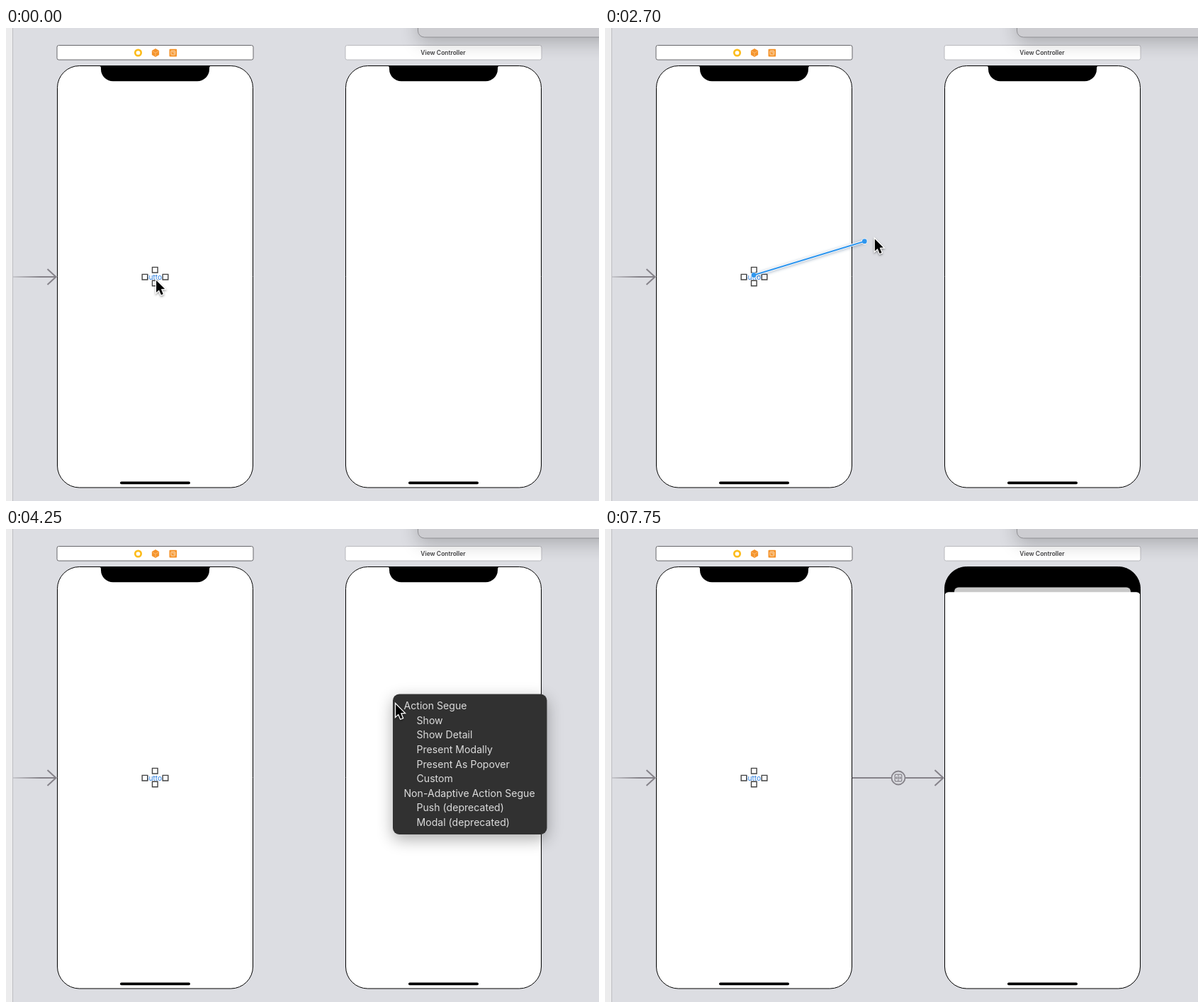
Recreate the animation shown at these times as an HTML page with a canvas. Size 837 by 669 pixels, loop 8000 ms.

```html
<!DOCTYPE html>
<html lang="en">
<head>
<meta charset="utf-8">
<title>Connecting two screens</title>
<style>
html, body { margin: 0; width: 100%; height: 100%; overflow: hidden; background: #dcdde2; }
canvas { display: block; }
</style>
</head>
<body>
<canvas id="stage" width="837" height="669"></canvas>
<script>
const ctx = document.getElementById('stage').getContext('2d');
const LOOP = 8000, STEP = 50;
const FONT = 'Inter, "Liberation Sans", sans-serif';
const GREY = '#858289', BLUE = '#2f96ee';
const RIGHT = 407; // offset of the second screen
const MENU = { x: 546, y: 233.5, w: 217.5, h: 198.5, row: 20.6 };
const ROWS = [
  'Action Segue', '  Show', '  Show Detail', '  Present Modally', '  Present As Popover',
  '  Custom', 'Non-Adaptive Action Segue', '  Push (deprecated)', '  Modal (deprecated)'
];

const progress = (t, a, b) => Math.min(1, Math.max(0, (t - a) / (b - a)));
const ease = k => k * k * (3 - 2 * k);
const mix = (a, b, k) => [a[0] + (b[0] - a[0]) * k, a[1] + (b[1] - a[1]) * k];
const move = (t, t0, t1, a, b) => mix(a, b, ease(progress(t, t0, t1)));

function layer(draw, alpha = 1) {
  ctx.save();
  ctx.globalAlpha *= alpha;
  draw();
  ctx.restore();
}

function paint(fill, stroke, width = 1) {
  if (fill) { ctx.fillStyle = fill; ctx.fill(); }
  if (stroke) { ctx.strokeStyle = stroke; ctx.lineWidth = width; ctx.stroke(); }
}

function box(x, y, w, h, r, fill, stroke, width) {
  ctx.beginPath();
  ctx.roundRect(x, y, w, h, r);
  paint(fill, stroke, width);
}

function disc(x, y, r, fill, stroke, width) {
  ctx.beginPath();
  ctx.arc(x, y, r, 0, 2 * Math.PI);
  paint(fill, stroke, width);
}

function line(points, stroke, width) {
  ctx.beginPath();
  points.forEach(p => ctx.lineTo(p[0], p[1]));
  paint(null, stroke, width);
}

function shadow(color, blur, dy) {
  ctx.shadowColor = color;
  ctx.shadowBlur = blur;
  ctx.shadowOffsetY = dy;
}

function text(str, x, y, size, color, weight = 400, align = 'center') {
  ctx.font = `${weight} ${size}px ${FONT}`;
  ctx.textAlign = align;
  ctx.fillStyle = color;
  ctx.fillText(str, x, y);
}

function background() {
  ctx.fillStyle = '#dcdde2';
  ctx.fillRect(0, 0, 837, 669);
  ctx.fillStyle = '#ececed';
  ctx.fillRect(0, 0, 9, 669);
  ctx.fillStyle = '#bdbdc1';
  ctx.fillRect(9, 0, 1, 669);
}

function panel() {
  layer(() => {
    shadow('rgba(0,0,0,.22)', 26, 8);
    box(581.5, -40, 300, 53, 9, '#cdcdd1');
  });
  box(581.5, -40, 300, 53, 9, null, '#8f8f93');
}

function titleBars() {
  box(72, 24.5, 277, 20.5, 2.5, '#fff', '#66666a');
  box(479, 24.5, 277, 20.5, 2.5, '#fff', '#b9b9be');
}

function icons() {
  disc(186.5, 35, 4.2, null, '#fcbc1c', 2.7);
  ctx.beginPath();
  for (let i = 0; i < 6; i++) {
    const a = Math.PI / 6 + i * Math.PI / 3;
    ctx.lineTo(211 + 5.9 * Math.cos(a), 35 + 5.9 * Math.sin(a));
  }
  paint('#f5942c');
  line([[206.5, 32.7], [211, 35.2], [215.5, 32.7]], '#fbc98d', .7);
  line([[211, 35.2], [211, 40]], '#fbc98d', .7);
  box(230.5, 29.8, 10.6, 10.6, 1, '#f5942c');
  box(233, 32.3, 5.6, 5.6, .5, null, '#fde0be', 1);
  line([[235.8, 33], [235.8, 35.2], [238, 35.2]], '#fde0be', .8);
}

function screenPath(dx) {
  ctx.beginPath();
  ctx.roundRect(72.5 + dx, 53.5, 276, 596.5, 31);
}

function notch(dx) {
  const l = 134 + dx, r = 287 + dx;
  ctx.beginPath();
  ctx.moveTo(l - 4, 53);
  ctx.quadraticCurveTo(l, 53, l, 57);
  ctx.arcTo(l, 75.3, l + 17, 75.3, 17);
  ctx.arcTo(r, 75.3, r, 57, 17);
  ctx.lineTo(r, 57);
  ctx.quadraticCurveTo(r, 53, r + 4, 53);
  paint('#000');
}

function phone(dx, asSheet) {
  screenPath(dx);
  paint(asSheet ? '#000' : '#fff');
  if (asSheet) {
    layer(() => {
      ctx.clip();
      box(493, 82.5, 249, 30, 6, '#c8c8c8');
      box(479, 89.3, 277, 600, 6, '#fff');
    });
  } else {
    notch(dx);
  }
  screenPath(dx);
  paint(null, '#000', 1);
  box(161 + dx, 641.6, 99, 3.6, 1.8, '#000');
}

function arrowHead(x) {
  line([[x - 12, 341], [x, 352], [x - 12, 363]], GREY, 2);
}

function entryArrow() {
  const fade = ctx.createLinearGradient(10, 0, 48, 0);
  fade.addColorStop(0, 'rgba(133,130,137,.25)');
  fade.addColorStop(1, GREY);
  line([[10, 352], [70, 352]], fade, 2);
  arrowHead(70.5);
}

function segue() {
  line([[349, 352], [404.5, 352]], GREY, 2);
  line([[423.5, 352], [477, 352]], GREY, 2);
  arrowHead(477.5);
  disc(414, 352, 9.5, null, GREY, 1.8);
  box(409.2, 347.2, 9.6, 9.6, 1, null, GREY, 1.2);
  line([[414, 347], [414, 357]], GREY, 1);
  line([[410.5, 352], [417.5, 352]], GREY, 1);
  line([[412, 350], [410.5, 352], [412, 354]], GREY, 1);
  line([[416, 350], [417.5, 352], [416, 354]], GREY, 1);
}

function button() {
  text('Button', 210.5, 355.8, 10.2, '#2b7ee0');
  [[210.3, 342.2], [210.3, 361], [196, 352.2], [225, 352.2]].forEach(([x, y]) =>
    box(x - 3.8, y - 3.8, 7.6, 7.6, 0, '#fff', '#414141', 1.4));
}

function highlight(dx) {
  const x = 71 + dx;
  layer(() => {
    box(x, 51.5, 280, 600.5, 1, 'rgba(0,117,255,.24)');
    box(x - .5, 51, 281, 601.5, 1, null, 'rgba(226,240,255,.6)');
  });
  layer(() => {
    shadow('rgba(0,0,0,.5)', 4, 1);
    box(x + 248.5, 646, 65, 16, 5, '#2b2d2c');
  });
  box(x + 249.2, 646.7, 63.6, 14.6, 4.5, null, '#e9edf0', 1.4);
  text('View', x + 281, 659.2, 14, '#fff', 600);
}

function connection(end) {
  const start = [210, 349.5];
  layer(() => {
    shadow('rgba(0,40,90,.35)', 4, 1);
    line([start, end], '#fff', 4);
  });
  [start, end].forEach(p => disc(p[0], p[1], 4.2, '#fff'));
  line([start, end], BLUE, 2.1);
  [start, end].forEach(p => disc(p[0], p[1], 3.4, BLUE));
}

function menu(active) {
  layer(() => {
    shadow('rgba(0,0,0,.32)', 22, 7);
    box(MENU.x, MENU.y, MENU.w, MENU.h, 9, '#313131');
  });
  ROWS.forEach((label, i) => {
    const mid = 250.2 + i * MENU.row, on = i === active;
    if (on) {
      ctx.fillStyle = '#141414';
      ctx.fillRect(MENU.x, mid - 10, MENU.w, MENU.row);
    }
    const indent = label.startsWith(' ') ? 18 : 0;
    text(label.trim(), 561.5 + indent, mid + 5, 14.1, on ? '#fff' : '#dcdcdc', on ? 500 : 400, 'left');
  });
}

function pointer([x, y]) {
  layer(() => {
    ctx.translate(x + .6, y + 1);
    ctx.lineJoin = 'miter';
    ctx.beginPath();
    [[0, 0], [0, 17], [3.9, 13.4], [6.9, 20.4], [9.7, 19.2], [6.8, 12.3], [12, 12]]
      .forEach(p => ctx.lineTo(p[0], p[1]));
    ctx.closePath();
    layer(() => {
      shadow('rgba(0,0,0,.4)', 3, 1.5);
      paint(null, '#fff', 2.6);
    });
    paint('#000');
  });
}

function hand() {
  const fingers = [[207.5, 343, 210.5, 350], [211.3, 340, 212.8, 349],
    [215.5, 340, 215.7, 349], [219.5, 342.8, 218.8, 350], [205.6, 349.3, 210, 354]];
  const palm = () => {
    ctx.beginPath();
    [[209.5, 348], [220, 347], [219.5, 353], [217.5, 358], [211, 358], [208, 353.5]]
      .forEach(p => ctx.lineTo(p[0], p[1]));
    ctx.closePath();
  };
  layer(() => {
    ctx.lineCap = ctx.lineJoin = 'round';
    fingers.forEach(f => line([[f[0], f[1]], [f[2], f[3]]], '#000', 5.2));
    palm();
    paint('#000', '#000', 3);
    fingers.forEach(f => line([[f[0], f[1]], [f[2], f[3]]], '#fff', 3));
    palm();
    paint('#fff', '#fff', .6);
    [212, 214.7, 217.4].forEach(x => line([[x, 349.5], [x, 354.5]], '#000', 1.1));
  });
}

const dragPoint = t => move(t, 2300, 3100, [211, 348], [549.5, 247]);

function pointerAt(t) {
  if (t < 850) return move(t, 50, 350, [211.5, 356], [208, 348]);
  if (t < 4250) return dragPoint(t);
  if (t < 5050) return move(t, 4250, 5050, [549.5, 247], [603, 287]);
  if (t < 7600) return move(t, 5050, 5350, [603, 287], [602, 274.5]);
  return move(t, 7600, 7700, [602, 274.5], [632, 211]);
}

function menuAlpha(t) {
  if (t < 6150) return progress(t, 3150, 3350);
  if (t >= 6900) return 0;
  return Math.max(.02, 1 - progress(t, 6150, 6290));
}

function activeRow(t, y) {
  if (t < 4250 || y < 260.5) return -1;
  return Math.floor((y - 240) / MENU.row);
}

function drag(t) {
  const lag = t < 3100 ? 22 : 0;
  const end = mix(dragPoint(t - lag), [549.5, 247], 0);
  layer(() => {
    if (end[0] < 350) highlight(0);
    else if (end[0] > 479) highlight(RIGHT);
    connection(end);
  }, 1 - progress(t, 3100, 3400));
}

function render(t) {
  const linked = t >= 6900;
  const tip = pointerAt(t);
  background();
  titleBars();
  icons();
  panel();
  text('View Controller', 617, 38.4, 8.5, '#424244', 600);
  phone(0, false);
  phone(RIGHT, linked);
  entryArrow();
  if (linked) segue();
  button();
  if (t >= 2350 && t < 3400) drag(t);
  const alpha = menuAlpha(t);
  if (alpha > 0) layer(() => menu(activeRow(t, tip[1])), alpha);
  if (t >= 850 && t < 2350) hand();
  else if (t < 7750) pointer(tip);
}

function tick(now) {
  render(Math.floor((now % LOOP) / STEP) * STEP);
  requestAnimationFrame(tick);
}
requestAnimationFrame(tick);
</script>
</body>
</html>
```
